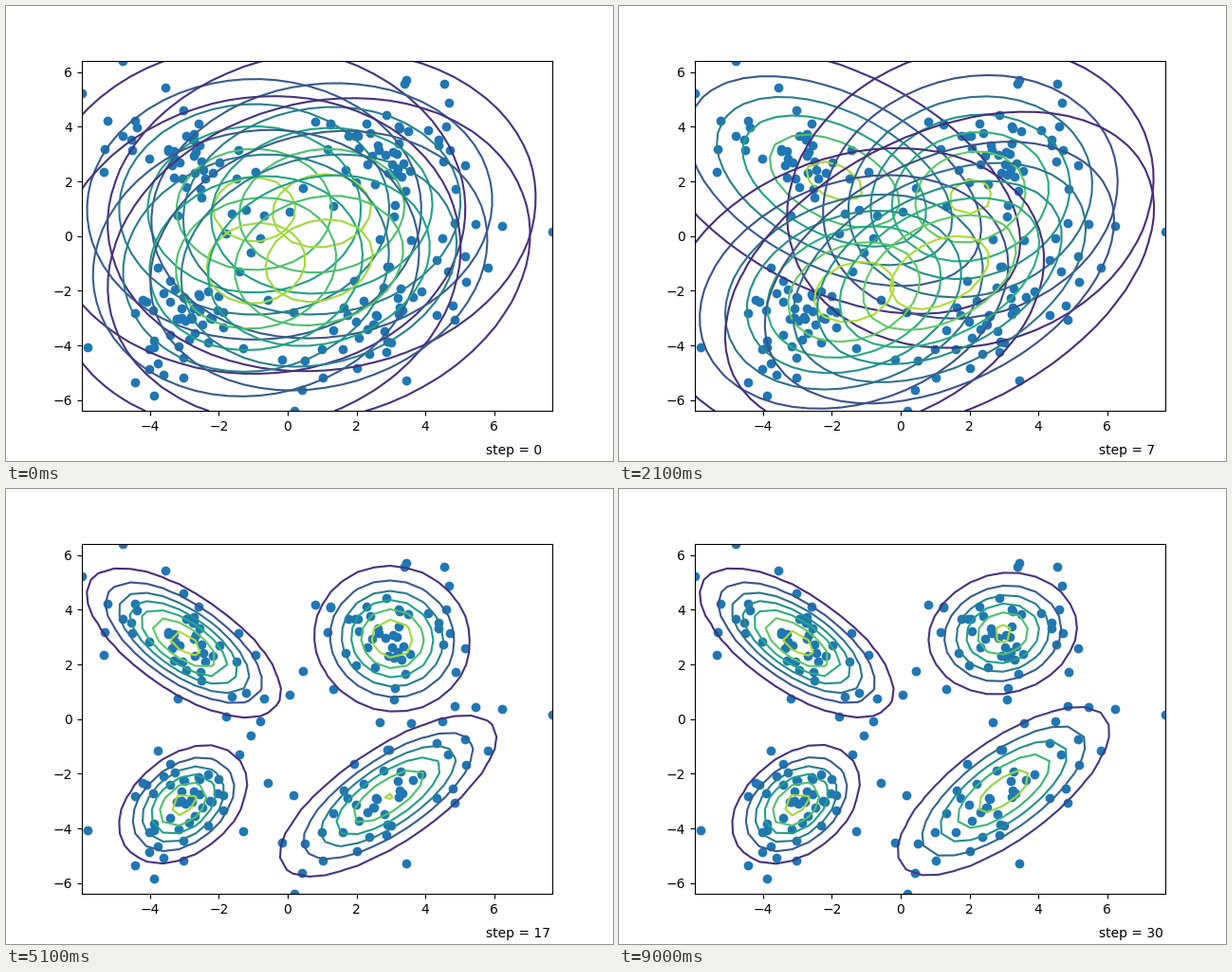
Recreate the animation shown at these times as a matplotlib script. Size 640 by 480 pixels, loop 9300 ms.

```python
import numpy as np
import matplotlib.pyplot as plt
from matplotlib.animation import FuncAnimation

STEPS = 31
PER_CLUSTER = 50
XLIM, YLIM = (-5.98, 7.69), (-6.40, 6.42)

# Mean, standard deviations, correlation and a few outliers of each cluster
CLUSTERS = [
    ((-2.98, 2.80), (1.435, 1.32), -0.66,
     [(-5.98, 5.24), (-4.79, 6.41), (0.06, 0.90), (0.44, 1.77),
      (-5.34, 2.36), (-3.20, 0.76)]),
    ((3.04, 3.06), (1.075, 1.23), 0.0,
     [(3.39, 5.57), (4.55, 5.57), (1.16, 3.17), (3.09, 0.73),
      (4.85, 0.47), (2.68, -0.12)]),
    ((-3.02, -3.11), (0.953, 1.108), 0.38,
     [(-3.88, -5.83), (-0.57, -2.34), (-1.07, -0.60), (-3.77, -1.15)]),
    ((2.97, -2.74), (1.64, 1.576), 0.74,
     [(7.69, 0.17), (6.23, 0.37), (0.18, -6.40), (0.42, -5.62),
      (-0.16, -4.52), (4.85, -3.06)]),
]


def sample(rng, mean, sd, rho, outliers):
    """Outliers plus normal draws that together have the given moments."""
    cov = np.outer(sd, sd) * [[1, rho], [rho, 1]]
    far = np.array(outliers) - mean
    n = PER_CLUSTER - len(far)
    shift = -far.sum(axis=0) / n
    rest = (PER_CLUSTER * cov - far.T @ far) / n - np.outer(shift, shift)
    z = rng.normal(size=(n, 2))
    z -= z.mean(axis=0)
    z = z @ np.linalg.inv(np.linalg.cholesky(np.cov(z.T, bias=True))).T
    return mean + np.vstack([far, shift + z @ np.linalg.cholesky(rest).T])


def density(points, mean, cov):
    d = points - mean
    m = np.sum(d @ np.linalg.inv(cov) * d, axis=-1)
    return np.exp(-m / 2) / (2 * np.pi * np.sqrt(np.linalg.det(cov)))


def em_step(weights, means, covs):
    resp = np.array([w * density(data, m, c)
                     for w, m, c in zip(weights, means, covs)])
    resp /= resp.sum(axis=0)
    total = resp.sum(axis=1)
    means = resp @ data / total[:, None]
    covs = [(r[:, None] * (data - m)).T @ (data - m) / t
            for r, m, t in zip(resp, means, total)]
    return total / len(data), means, covs


rng = np.random.default_rng(7)
data = np.vstack([sample(rng, *c) for c in CLUSTERS])

state = (np.full(4, 0.25),
         np.array([(-1, 1), (1, 1), (-1, -1), (1, -1)]),
         [np.cov(data.T)] * 4)
history = []
for _ in range(STEPS):
    state = em_step(*state)
    history.append(state)

fig, ax = plt.subplots(figsize=(6.4, 4.8), dpi=100)
ax.set(xlim=XLIM, ylim=YLIM)
X, Y = np.meshgrid(np.linspace(*XLIM, 30), np.linspace(*YLIM, 30))
grid = np.stack([X, Y], axis=-1)
ax.scatter(*data.T)
label = fig.text(0.79, 0.015, "")
drawn = []


def update(step):
    while drawn:
        drawn.pop().remove()
    _, means, covs = history[step]
    for mean, cov in zip(means, covs):
        drawn.append(ax.contour(X, Y, density(grid, mean, cov)))
    label.set_text(f"step = {step}")


anim = FuncAnimation(fig, update, frames=STEPS, interval=300, repeat=True,
                     init_func=lambda: update(0))
plt.show()
```
